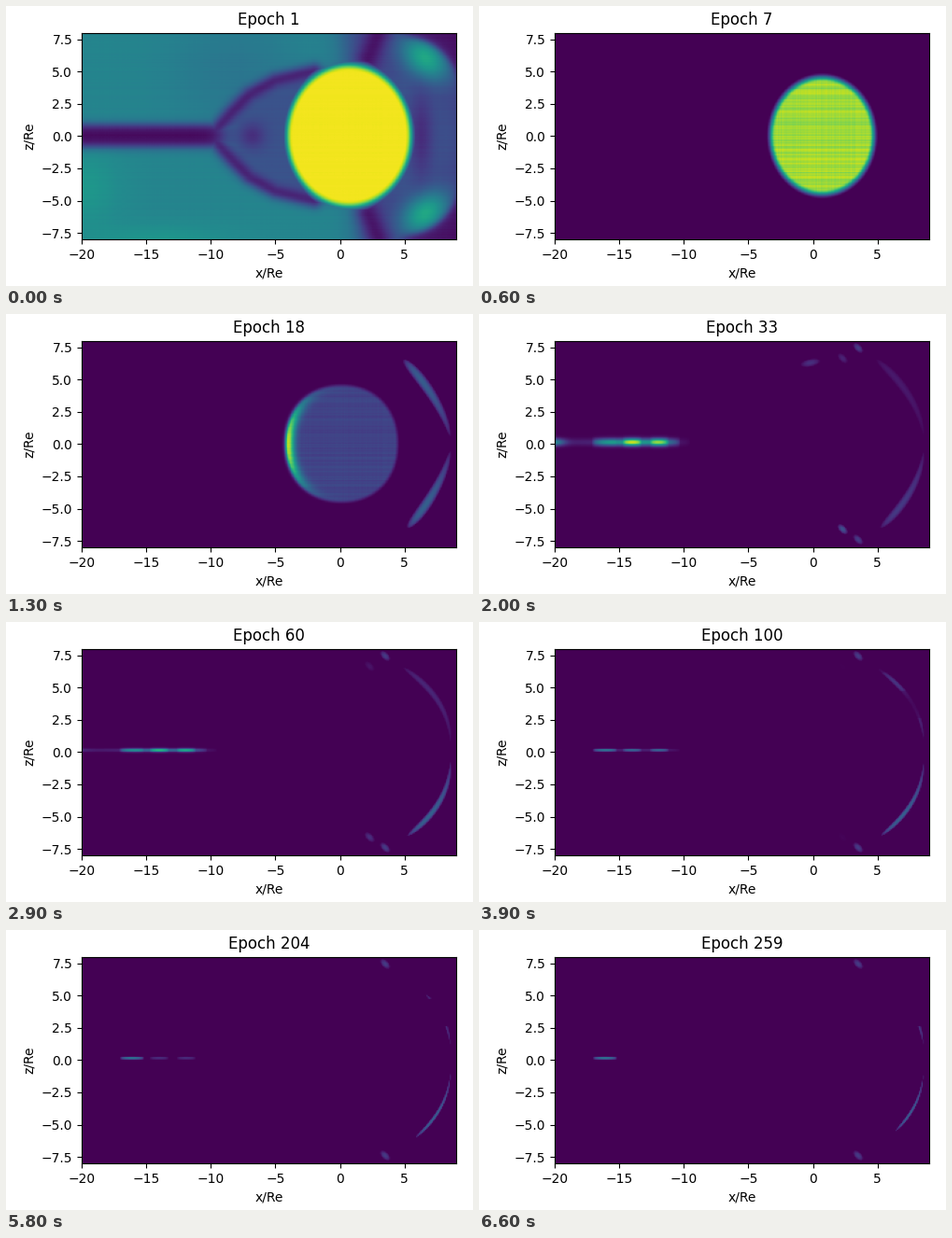
Recreate the animation shown at these times as a matplotlib script. Size 500x300 px, loop 6700 ms.

```python
import numpy as np
import matplotlib.pyplot as plt
from matplotlib.animation import FuncAnimation

W, H, DPI = 500, 300, 100
FRAMES, STEP = 67, 100
NX, NZ = 290, 160

rng = np.random.default_rng(4)
X, Z = np.meshgrid(np.linspace(-19.95, 8.95, NX), np.linspace(-7.95, 7.95, NZ))
AZ = np.abs(Z)
WEAVE = 0.8 * rng.uniform(-1, 1, (NZ, 1)) + 0.25 * rng.uniform(-1, 1, (1, NX))


def ramp(n, start, stop):
    return np.clip((n - start) / (stop - start), 0, 1)


def smooth(t):
    return t * t * (3 - 2 * t)


def sigmoid(v):
    return 1 / (1 + np.exp(-v))


def quad(cx, cz, a, b, deg=0, z=Z):
    """Squared elliptic distance from a rotated centre."""
    t = np.radians(deg)
    dx, dz = X - cx, z - cz
    u = dx * np.cos(t) + dz * np.sin(t)
    v = dz * np.cos(t) - dx * np.sin(t)
    return (u / a) ** 2 + (v / b) ** 2


def blob(*args, **kw):
    return np.exp(-quad(*args, **kw))


def spot(*args):
    return np.clip(1 - quad(*args), 0, 1)


def stroke(pts, width):
    """Soft polyline, mirrored about z = 0."""
    dist = np.full(X.shape, 99.0)
    for (x0, z0), (x1, z1) in zip(pts, pts[1:]):
        ux, uz = x1 - x0, z1 - z0
        t = np.clip(((X - x0) * ux + (AZ - z0) * uz) / (ux * ux + uz * uz), 0, 1)
        dist = np.minimum(dist, np.hypot(X - x0 - t * ux, AZ - z0 - t * uz))
    return np.exp(-(dist / width) ** 2)


def first_guess():
    """Blurry magnetosphere of the untrained state."""
    f = 0.45 - 0.06 * blob(-8, 5, 5, 4) + 0.08 * blob(-20, -4, 3, 3)
    f += 0.07 * blob(-14, -8, 6, 1.2)
    day = sigmoid((X - 0.9 + 0.08 * Z) / 0.6)
    f += (0.2 - f) * day
    inside = sigmoid((1 - quad(0, 0, 9, 5)) * 9)
    f += (0.25 - f) * inside
    f -= 0.12 * blob(-6.8, 0, 1, 1) + 0.12 * blob(6.3, 0, 0.9, 3.5)
    f += 0.4 * blob(6.6, 6, 2.1, 1.5, -40, z=AZ)
    sheet = sigmoid((0.85 - AZ) / 0.2) * sigmoid((-9 - X) / 0.4)
    fork = stroke([(-10, 0), (-8.5, 1.7), (-7, 3.2), (-5, 4.3), (-2, 5)], 0.6)
    pole = stroke([(2.2, 6), (3, 8)], 0.9)
    corner = sigmoid((np.hypot(X - 4.8, np.maximum(AZ - 3.2, 0)) - 4.5) / 0.15)
    corner = corner * sigmoid((X - 5) / 0.3) * sigmoid((AZ - 3.8) / 0.5)
    dark = np.maximum.reduce([sheet, 0.75 * fork, 0.8 * pole, 0.85 * corner])
    return np.clip(f * (1 - 0.95 * dark), 0.01, 1) + 0.008 * WEAVE


GUESS = first_guess()


def disc(n):
    def key(*values):
        return np.interp(n, (0, 6, 13), values)

    u = (X - key(0.7, 0.72, 0.15)) / key(5.4, 4.35, 4.5)
    v = Z / key(6.15, 4.9, 4.7)
    p = key(2, 2, 2.15)
    r = (np.abs(u) ** p + np.abs(v) ** p) ** (1 / p)
    body = smooth(np.clip((1 - r) / key(0.19, 0.16, 0.09), 0, 1))
    body = body * (key(0.98, 0.86, 0.2) + key(0.005, 0.065, 0.025) * WEAVE)
    glow = np.exp(-((r - 0.93) / np.where(r < 0.93, 0.11, 0.05)) ** 2)
    side = np.exp(-(np.arctan2(v, -u) / 0.72) ** 2)
    return (body + key(0, 0, 0.72) * glow * side) * (1 - ramp(n, 13, 20))


def arc(n, side):
    """Magnetopause crescent above (1) or below (-1) the axis."""
    late, up = max(n - 13, 0), side > 0
    power = 1.6 + 0.9 * ramp(n, 13, 29)
    drop = 3.5 if up else 3.2
    inner = 0.4 + 0.012 * n
    outer = 6.5 - (3 if up else 1) * ramp(n, 29, 66) ** 3
    width = 0.1 + 0.45 * np.exp(-late / 25)
    amp = (0.4 - 0.18 * np.exp(-((n - 20) / 4) ** 2)) * ramp(n, 6, 13)
    if up:
        crumble = ramp(n, 29, 50)
        amp = amp * (0.35 + 0.6 * np.exp(-late / 3))
        amp = amp * (1 + crumble * np.cos(2 * np.pi * (Z - 1.9) / 3.5)).clip(0)
        amp = amp * (1 - crumble * (np.cos(2 * np.pi * (Z - 1.9) / 3.5) < 0.3))
    s = AZ / 6.4
    dist = (X - 8.6 + drop * s ** power)
    dist = dist / np.hypot(1, drop * power / 6.4 * s ** (power - 1))
    t = np.clip((side * Z - inner) / (outer - inner), 0, 1)
    taper = np.sqrt(np.maximum(t * (1 - t ** 6), 1e-4))
    return amp * taper * np.clip(1 - (dist / (width * taper)) ** 2, 0, 1)


def tail(n):
    """Current sheet that thins out and breaks into beads."""
    def bead(cx, half):
        return np.sqrt(np.clip(1 - ((X - cx) / half) ** 2, 0, 1))

    late = max(n - 20, 0)
    height = 0.08 + 0.2 * np.exp(-late / 6)
    along = 0.45 * (1 - ramp(n, 20, 45)) * bead(-13.7, 3.4)
    along += 0.1 * (1 - ramp(n, 29, 36)) * bead(-15, 5.5)
    along += 0.4 * np.exp(-late / 5 - ((X + 20) / 0.8) ** 2)
    along += (0.1 + 0.4 * ramp(n, 20, 45)) * bead(-16.1, 0.9)
    for cx in (-14, -11.9):
        along += 0.42 * np.sqrt(1 - ramp(n, 14, 66)) * bead(cx, 0.7)
    return ramp(n, 14, 20) * along * np.exp(-((Z - 0.12) / height) ** 2)


def specks(n):
    f = 0.14 * ramp(n, 14, 20) * (1 - ramp(n, 20, 28)) * spot(-0.2, 6.25, 0.8, 0.3, 12)
    for side in (-1, 1):
        near = 0.25 * (1 - ramp(n, 20, 40)) * (0.4 if side > 0 else 1)
        for k, amp in enumerate((near, 0.18)):
            shape = spot(2.3 + 1.2 * k, side * (6.6 + 0.8 * k), 0.5, 0.27, -45)
            f = np.maximum(f, amp * ramp(n, 14, 20) * shape)
    return f


def field(n):
    layers = [GUESS * (1 - ramp(n, 0, 6)) ** 2.5, disc(n),
              arc(n, 1), arc(n, -1), tail(n), specks(n)]
    return np.clip(np.maximum.reduce(layers), 0, 1)


def epoch(n):
    return sum(1 + i // 10 for i in range(n + 1))


fig = plt.figure(figsize=(W / DPI, H / DPI), dpi=DPI)
ax = fig.add_axes([81 / W, 50 / H, 401 / W, 221.2 / H])
img = ax.imshow(field(0), extent=(-20, 9, -8, 8), origin="lower",
                aspect="auto", cmap="viridis", vmin=0, vmax=1)
ax.set_xticks(range(-20, 6, 5))
ax.set_yticks(np.arange(-7.5, 8, 2.5))
ax.set_xlabel("x/Re")
ax.set_ylabel("z/Re")
title = ax.set_title("Epoch 1")


def update(n):
    img.set_data(field(n))
    title.set_text(f"Epoch {epoch(n)}")
    return img, title


anim = FuncAnimation(fig, update, frames=FRAMES, interval=STEP,
                     repeat=True, repeat_delay=0, blit=False)
plt.show()
```
